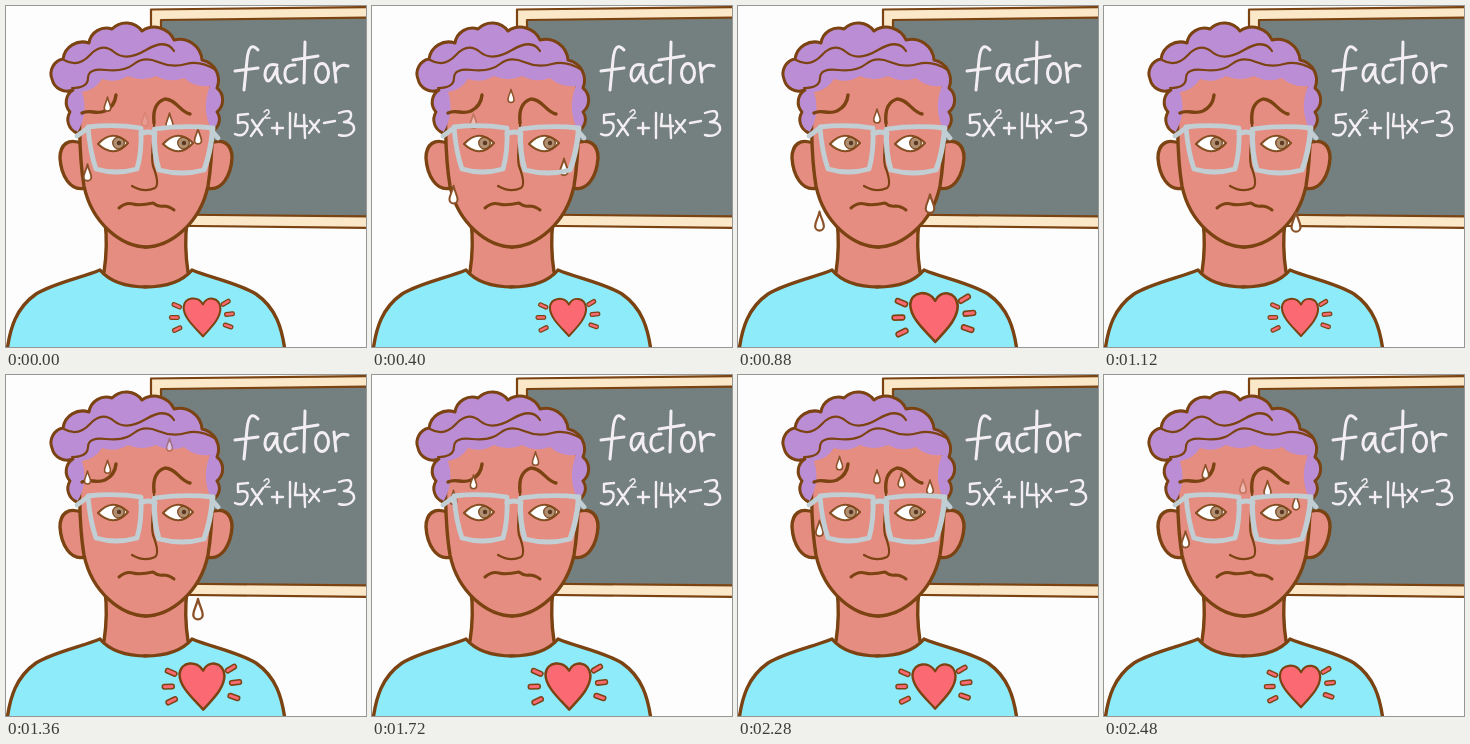
Animation, 360 px wide and 341 px high, one loop 2.52 s. Source, as an HTML page:

```html
<!DOCTYPE html>
<html lang="en">
<head>
<meta charset="utf-8">
<title>Worried at the board</title>
<style>
html, body { margin: 0; width: 100%; height: 100%; overflow: hidden; background: #fdfdfd; }
svg { display: block; width: 360px; height: 341px; }
svg * { stroke-linecap: round; stroke-linejoin: round; }
.line { fill: none; stroke: #7b4312; stroke-width: 3.4; }
.thin { stroke-width: 2.2; }
.skin { fill: #e68d82; }
.shirt { fill: #8debfa; }
.chalk { fill: none; stroke: #f3eef1; stroke-width: 3; }
.glasses { fill: none; stroke: #c1ced4; stroke-width: 4.8; }
.drop { fill: #fff; stroke: #8b5229; stroke-width: 1.7; }
</style>
</head>
<body>
<svg viewBox="0 0 360 341">
  <g class="line thin">
    <path fill="#fae8c8" d="M145 3.5L364 1V222L145 219.5Z"/>
    <path fill="#74807f" d="M155 14L364 11.5V210.5L155 208.5Z"/>
  </g>
  <g class="chalk" role="img" aria-label="factor">
    <path d="M252 44Q243 34 241 54L238 84M229 65L252 62"/>
    <path d="M271 59Q259 56 259 70Q262 83 271 62Q270 74 275 77"/>
    <path d="M289 59Q278 58 279 70Q281 80 291 73"/>
    <path d="M299 36L298 77M287 54L312 50"/>
    <ellipse cx="316" cy="67" rx="6.5" ry="9.5"/>
    <path d="M328 57L330 76M329 66Q333 57 342 60"/>
  </g>
  <g class="chalk" style="stroke-width:2.4" role="img" aria-label="5x² + 14x − 3">
    <path d="M242 108L232 109V117Q244 114 241 124Q237 132 229 128"/>
    <path d="M246 114L256 129M257 113L245 130M266 122H277M271 117V128"/>
    <path d="M258 106Q263 101 263 107L258 112H264" stroke-width="1.5"/>
    <path d="M284 107V132M290 108L289 120H301M298 109L299 132"/>
    <path d="M304 115L313 126M313 114L303 127M318 117L329 115"/>
    <path d="M333 107Q346 102 345 110Q344 115 338 116Q349 116 348 124Q344 132 333 129"/>
  </g>

  <!-- The body is symmetric: each half is drawn once and mirrored. -->
  <path class="skin" d="M99 205H181V285H99Z"/>
  <g id="body" class="line">
    <path d="M99 215Q102 240 98 266"/>
    <path class="shirt" d="M141 281C122 281 104 276 94 264C75 272 48 277 30 288C10 302 4 322 1 345H141"/>
    <path class="skin" d="M77 138C62 131 54 139 54 152C55 169 64 186 79 182"/>
    <path class="skin" d="M141 65H76C72 100 73 150 78 180C86 218 116 241 141 241"/>
  </g>
  <use href="#body" transform="translate(280) scale(-1 1)"/>

  <path id="hair" fill="#bb8dd4"/>
  <path id="curls" class="line" style="stroke-width:3"/>
  <path class="line thin" d="M58 54Q72 62 84 49T108 46T140 44T168 45M66 82Q82 82 82 72T100 64T128 58T152 56T180 58T210 64"/>

  <path class="line" d="M76 107C84 103 90 109 99 105Q109 100 110 89M184 108C174 106 170 93 159 93Q146 97 148 117"/>
  <path class="line thin" d="M148 116C149 132 144 148 147 160Q154 178 149 182Q138 187 126 180"/>
  <path class="line" style="stroke-width:3" d="M113 202Q120 196 127 198T147 197Q152 201 157 200Q163 200 168 204"/>

  <g id="eye">
    <path fill="#fff" d="M92 138Q107 122 122 137Q108 153 92 138Z"/>
    <circle cx="112.5" cy="137" r="5.8" fill="#b08e70" stroke="#7b4a24" stroke-width="1.3"/>
    <circle cx="113" cy="137" r="2.2" fill="#5a3822"/>
    <path class="line thin" d="M92 138Q107 122 122 137Q108 153 92 138" stroke-opacity=".9"/>
  </g>
  <use href="#eye" x="65"/>

  <g id="drops"></g>

  <g class="glasses">
    <path id="lens" d="M82 121Q108 118 135 122Q136 146 131 163Q110 169 90 163Q84 146 82 121Z"/>
    <use href="#lens" transform="matrix(-1.1 0 0 1 297 1)"/>
    <path d="M135 128Q142 124 149 128M82 122L71 130M206 125L212 132"/>
  </g>

  <g id="heart" class="line">
    <path fill="#fb6a72" stroke-width="2.1" d="M1-13C-4-22-18-21-19-10C-19 1-7 11 1 20C9 11 19 2 19-9C18-21 5-22 1-13Z"/>
    <g id="rays" fill="#fb6a72" stroke-width="1.3"></g>
  </g>
</svg>
<script>
const LOOP = 2520, STEP = 40, FADE = 160, BEATS = 7;
const NS = "http://www.w3.org/2000/svg";
const $ = id => document.getElementById(id);

function add(parent, tag, attrs) {
  const el = document.createElementNS(NS, tag);
  for (const k in attrs) el.setAttribute(k, attrs[k]);
  return parent.appendChild(el);
}

// Joins points with outward arcs; a larger radius gives flatter puffs.
function puffs(points, radius) {
  return points.slice(1).map(([x, y], i) => {
    const r = radius * Math.hypot(x - points[i][0], y - points[i][1]);
    return `A${r} ${r} 0 0 1 ${x} ${y}`;
  }).join("");
}

const crown = [[71, 127], [64, 106], [67, 84], [46, 73], [57, 53], [83, 37], [106, 23],
  [136, 25], [168, 34], [196, 54], [211, 82], [211, 106], [206, 125]];
const fringe = [crown.at(-1), [204, 80], [178, 72], [150, 70], [122, 70], [96, 73], [76, 86], crown[0]];
const outline = `M${crown[0]}` + puffs(crown, .65);
$("curls").setAttribute("d", outline);
$("hair").setAttribute("d", outline + puffs(fringe, 1.2));

// Three rays fan out on each side of the heart.
for (const side of [-6, 179])
  for (const i of [-1, 0, 1])
    add($("rays"), "rect", {
      x: 23.5, y: -1.9, width: 10, height: 3.8, rx: 1.6,
      transform: `rotate(${side + 25 * i})`
    });

const drops = [];
function drip(x, y, start, life, speed = .042) {
  const el = add($("drops"), "path", {
    class: "drop",
    d: "M0-8C1-3 3.4 0 3.4 3.4A3.4 3.4 0 0 1-3.4 3.4C-3.4 0-1-3 0-8Z"
  });
  drops.push({ el, x, y, start, life, speed });
}

drip(192, 82, 1880, 2160, .0765);
drip(81.5, 92, 1160, 2440, .0553);
drip(101.5, 71, 1860, 1120);
drip(101.5, 83, 1140, 760);
drip(139, 82, 200, 900);
drip(139, 81, 1840, 700, .048);
drip(163.5, 67, 1280, 1420, .039);

function draw(t) {
  for (const d of drops) {
    const age = (t - d.start + LOOP) % LOOP;
    const fall = age * d.speed;
    const alpha = Math.max(0, Math.min(1, age / FADE, (d.life - age) / FADE));
    d.el.setAttribute("opacity", alpha);
    d.el.setAttribute("transform",
      `translate(${d.x} ${d.y + fall}) scale(${.85 + fall * .0035})`);
  }
  const beat = 2 * Math.PI * ((t - 28) * BEATS / LOOP);
  const size = (44 - 7 * Math.cos(beat)) / 39;
  $("heart").setAttribute("transform", `translate(196 311) scale(${size})`);
}

const begin = performance.now();
function tick() {
  const t = Math.max(0, performance.now() - begin) % LOOP;
  draw(Math.floor(t / STEP) * STEP);
  requestAnimationFrame(tick);
}
tick();
</script>
</body>
</html>
```
